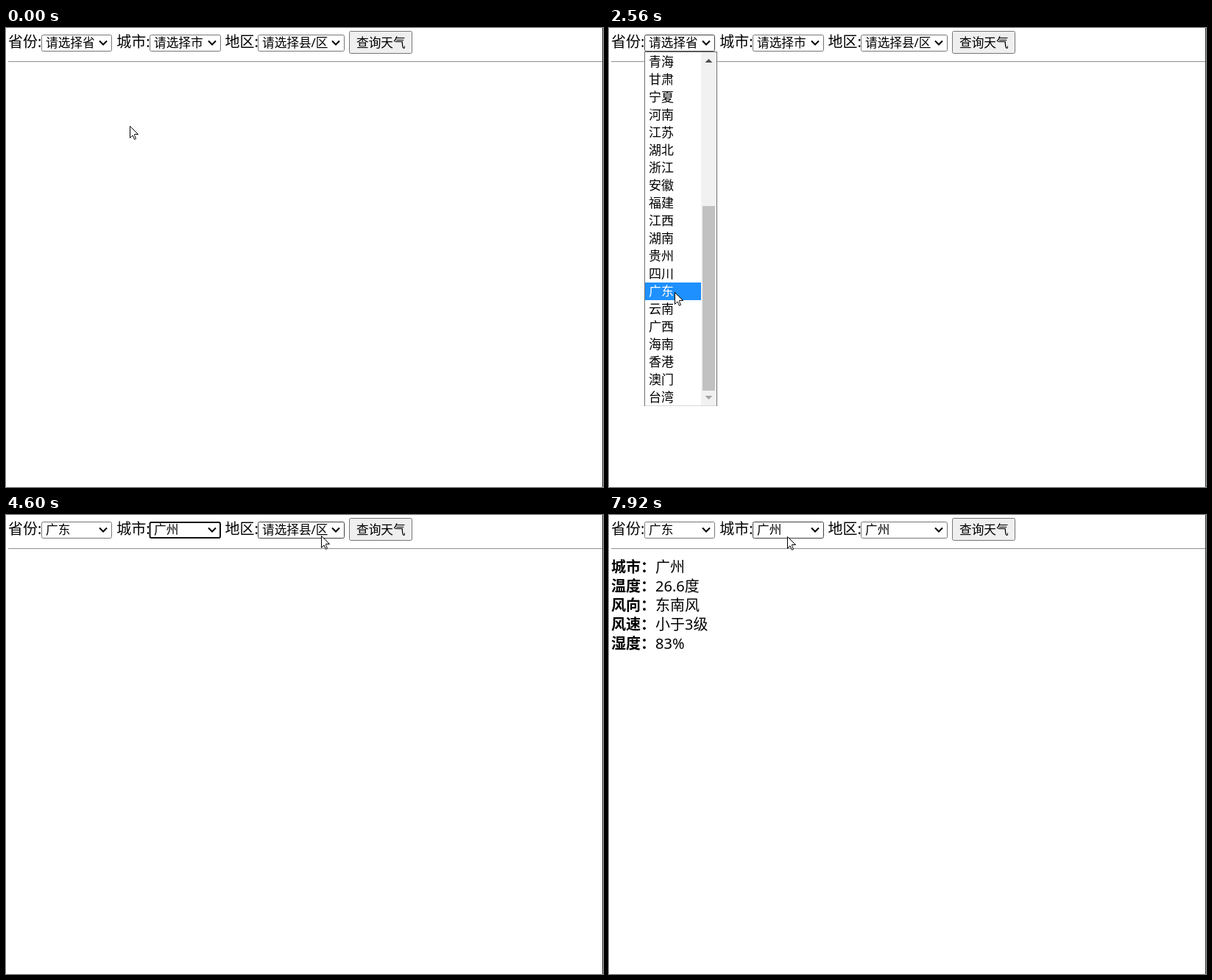
Recreate the animation shown at these times as an HTML page with a canvas. Size 811 px wide and 624 px high, loop 8 s.

```html
<!DOCTYPE html>
<html lang="zh-CN">
<head>
<meta charset="utf-8">
<title>天气查询</title>
<style>
  html, body { margin: 0; width: 100%; height: 100%; overflow: hidden; background: #fff; }
  canvas { display: block; }
</style>
</head>
<body>
<canvas id="stage" width="811" height="624"></canvas>
<script>
const ctx = document.getElementById('stage').getContext('2d');
const LOOP = 8000;
const FONT = '"Noto Sans", "Noto Sans CJK SC", "Noto Sans CJK", sans-serif';
const LABEL = `20px ${FONT}`;
const CONTROL = `16.67px ${FONT}`;
const LIST = `17px ${FONT}`;
const ROW = 24, LIST_TOP = 33, VIEW = 481, VISIBLE_ROWS = 20;

const selects = [
  { label: '省份:', width: 96.7, listWidth: 99, rows: 35,
    options: ('请选择省 北京 上海 天津 重庆 黑龙江 吉林 辽宁 内蒙古 河北 山西 陕西 山东 新疆 西藏 青海 甘肃 宁夏 ' +
      '河南 江苏 湖北 浙江 安徽 福建 江西 湖南 贵州 四川 广东 云南 广西 海南 香港 澳门 台湾').split(' ') },
  { label: '城市:', width: 96.7, listWidth: 99, rows: 22,
    options: ('请选择市 广州 韶关 惠州 梅州 汕头 深圳 珠海 佛山 肇庆 湛江 江门 河源 清远 云浮 潮州 东莞 ' +
      '中山 阳江 揭阳').split(' ') },
  { label: '地区:', width: 117.7, listWidth: 116, rows: 6,
    options: '请选择县/区 广州 番禺 从化 增城 花都'.split(' ') },
];
selects.forEach((select, i) => {
  select.labelX = 3 + 147.3 * i;
  const left = select.labelX + 45;
  select.x = Math.floor(left);
  select.w = Math.floor(left + select.width) - select.x;
  select.listX = Math.ceil(left);
});
const button = { x: 466, y: 4, w: 86, h: 31 };
const report = [['城市', '广州'], ['温度', '26.6度'], ['风向', '东南风'], ['风速', '小于3级'], ['湿度', '83%']];

const start = { x: 168, y: 133, open: -1, focus: -1, picked: ['请选择省', '请选择市', '请选择县/区'], done: false };

// The pointer travels to each place between the two times.
const glides = [
  { from: 120, to: 430, x: 129, y: 21 },
  { from: 1160, to: 1520, x: 103, y: 291 },
  { from: 1670, to: 1670, x: 101, y: 370 },
  { from: 1820, to: 1820, x: 101, y: 391 },
  { from: 2270, to: 2560, x: 89, y: 359 },
  { from: 2810, to: 3300, x: 249, y: 24 },
  { from: 3450, to: 3570, x: 254, y: 20 },
  { from: 3840, to: 3960, x: 256, y: 68 },
  { from: 4360, to: 4600, x: 428, y: 28 },
  { from: 4850, to: 4850, x: 422, y: 23 },
  { from: 5150, to: 5270, x: 414, y: 61 },
  { from: 5680, to: 6040, x: 521, y: 25 },
  { from: 7500, to: 7770, x: 186, y: 25 },
  { from: 7920, to: 7920, x: 242, y: 29 },
];

const actions = [
  { at: 860, open: 0 },
  { at: 1670, hovered: '新疆' },
  { at: 1820, hovered: null },
  { at: 2810, open: -1, focus: 0, picked: ['广东', '请选择市', '请选择县/区'] },
  { at: 3450, focus: -1 },
  { at: 3570, open: 1 },
  { at: 4360, open: -1, focus: 1, picked: ['广东', '广州', '请选择县/区'] },
  { at: 5000, open: 2, focus: -1 },
  { at: 5680, open: -1, focus: 2, picked: ['广东', '广州', '广州'] },
  { at: 6330, focus: -1 },
  { at: 6450, done: true },
];

const clamp = (v) => Math.min(1, Math.max(0, v));
const smooth = (p) => p * p * (3 - 2 * p);
const easeOut = (p) => 1 - (1 - p) ** 2;

// Screen captures come at a low rate, so a glide shows as a few jumps.
function glideProgress({ from, to }, time) {
  const gaps = Math.round((to - from) / 130);
  if (gaps === 0) return 1;
  return clamp((Math.floor((time - from) / (to - from) * gaps) + 1) / (gaps + 1));
}

function pointerAt(time) {
  let { x, y } = start;
  for (const glide of glides) {
    if (glide.from > time) break;
    const p = glideProgress(glide, time);
    x += (glide.x - x) * easeOut(p);
    y += (glide.y - y) * smooth(p);
  }
  return { x: Math.round(x), y: Math.round(y) };
}

function wheelScroll(time, max) {
  if (time < 1670) return 0;
  const p = clamp(Math.floor((time - 1670) / 150) / 2);
  return Math.round(2 + (max - 2) * smooth(p));
}

function stateAt(time) {
  const past = actions.filter(({ at }) => at <= time);
  const state = Object.assign({}, start, ...past, pointerAt(time));
  state.scroll = state.open === 0 ? wheelScroll(time, selects[0].rows * ROW - VIEW) : 0;
  return state;
}

function rect(x, y, w, h, color) {
  ctx.fillStyle = color;
  ctx.fillRect(x, y, w, h);
}

function text(string, x, baseline, font, color = '#000') {
  ctx.font = font;
  ctx.fillStyle = color;
  ctx.fillText(string, x, baseline);
}

function box(x, y, w, h, fill, border, line = 1) {
  ctx.beginPath();
  ctx.roundRect(x + line / 2, y + line / 2, w - line, h - line, 2);
  ctx.fillStyle = fill;
  ctx.fill();
  ctx.strokeStyle = border;
  ctx.lineWidth = line;
  ctx.stroke();
}

function isOver(state, x, y, w, h) {
  return state.open < 0 && state.x >= x && state.x < x + w && state.y >= y && state.y < y + h;
}

function drawSelect({ label, labelX, x, w }, index, state) {
  const active = state.open === index || isOver(state, x, 9, w, 23);
  text(label, labelX, 26, LABEL);
  if (state.focus === index) box(x - 0.5, 9, w + 0.5, 23, '#fff', '#101010', 2);
  else box(x, 9, w, 23, '#fff', active ? '#404040' : '#767676');
  text(state.picked[index], x + 6, 26, CONTROL);

  const middle = x + w - 12;
  ctx.beginPath();
  ctx.moveTo(middle - 5, 17.5);
  ctx.lineTo(middle, 22.5);
  ctx.lineTo(middle + 5, 17.5);
  ctx.strokeStyle = '#000';
  ctx.lineWidth = 2;
  ctx.stroke();
}

function drawArrow(x, y, direction, enabled) {
  ctx.beginPath();
  ctx.moveTo(x - 5, y + 2.5 * direction);
  ctx.lineTo(x + 5, y + 2.5 * direction);
  ctx.lineTo(x, y - 2.5 * direction);
  ctx.fillStyle = enabled ? '#505050' : '#a3a3a3';
  ctx.fill();
}

function drawScrollbar(x, rows, scroll) {
  const track = 439, content = rows * ROW, maxScroll = content - VIEW;
  const thumb = Math.round(track * VIEW / content);
  const offset = Math.round((track - thumb) * scroll / maxScroll);
  rect(x, LIST_TOP, 21, VIEW, '#f1f1f1');
  rect(x + 2, 54 + offset, 17, thumb, '#c1c1c1');
  drawArrow(x + 10.5, 44.5, 1, scroll > 0);
  drawArrow(x + 10.5, 502.5, -1, scroll < maxScroll);
}

function drawList({ listX, listWidth, rows, options }, state) {
  const scrolls = rows > VISIBLE_ROWS;
  const height = scrolls ? VIEW : rows * ROW + 1;
  const innerWidth = listWidth - (scrolls ? 23 : 2);
  const rowUnder = Math.max(0, Math.floor((state.y - LIST_TOP + state.scroll) / ROW));
  const highlighted = state.hovered ?? options[rowUnder];

  rect(listX, 32, listWidth, height + 1, '#707070');
  ctx.save();
  ctx.beginPath();
  ctx.rect(listX + 1, LIST_TOP, listWidth - 2, height - 1);
  ctx.clip();
  ctx.fillStyle = '#fff';
  ctx.fill();
  options.forEach((option, i) => {
    const y = LIST_TOP + i * ROW - state.scroll;
    const lit = option === highlighted;
    if (lit) rect(listX + 1, y, innerWidth, ROW, '#1e90ff');
    text(option, listX + 6, y + 18, LIST, lit ? '#fff' : '#000');
  });
  ctx.restore();
  if (scrolls) {
    drawScrollbar(listX + listWidth - 22, rows, state.scroll);
    rect(listX + 1, 513, listWidth - 2, 1, '#d8d8d8');
  }
}

const pointer = new Path2D('M.5 .5V16.5L4 13 6.5 18.5 8.5 17.5 6.5 12.5V11.5H11.5Z');

function drawPointer({ x, y }) {
  ctx.save();
  ctx.translate(x, y);
  ctx.fillStyle = '#fff';
  ctx.fill(pointer);
  ctx.strokeStyle = '#000';
  ctx.lineWidth = 1;
  ctx.stroke(pointer);
  ctx.restore();
}

function draw(time) {
  const state = stateAt(time);
  rect(0, 0, 811, 624, '#fff');
  rect(3, 45, 807, 1, '#9a9a9a');
  rect(3, 46, 807, 1, '#eee');
  rect(810, 0, 1, 624, '#333');

  selects.forEach((select, i) => drawSelect(select, i, state));
  const { x, y, w, h } = button;
  const hover = isOver(state, x, y, w, h);
  box(x, y, w, h, hover ? '#e5e5e5' : '#efefef', hover ? '#4f4f4f' : '#767676');
  text('查询天气', x + 10, 26, CONTROL);

  if (state.done) {
    report.forEach(([name, value], i) => {
      const baseline = 78 + i * 26;
      text(name + '：', 3, baseline, `bold ${LABEL}`);
      text(value, 63, baseline, LABEL);
    });
  }
  if (state.open >= 0) drawList(selects[state.open], state);
  drawPointer(state);
}

const begin = performance.now();
function tick() {
  draw((performance.now() - begin) % LOOP);
  requestAnimationFrame(tick);
}
tick();
</script>
</body>
</html>
```
